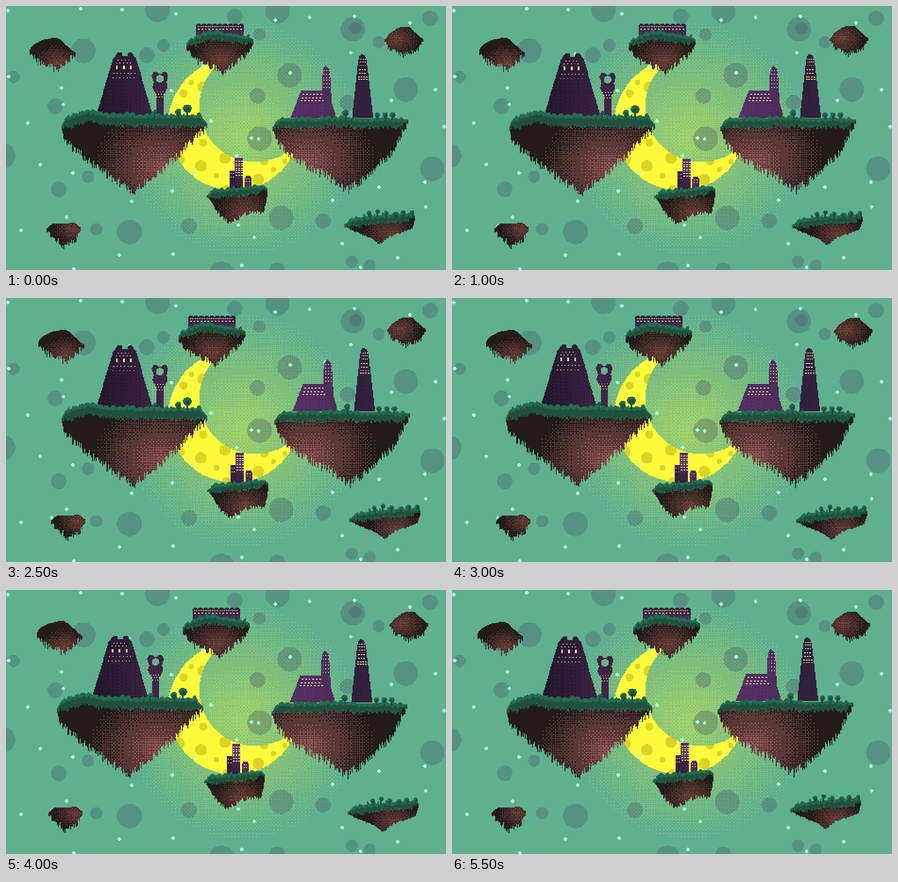
Recreate the animation shown at these times as an HTML page with a canvas. Size 966 by 580 pixels, loop 6 s.

```html
<!DOCTYPE html>
<html lang="en">
<head>
<meta charset="utf-8">
<title>Floating islands</title>
<style>
html, body { margin: 0; width: 100%; height: 100%; overflow: hidden; background: #5fb08f; }
canvas { display: block; width: 966px; height: 580px; image-rendering: pixelated; }
</style>
</head>
<body>
<canvas id="stage" width="500" height="300"></canvas>
<script>
// The art is 500 x 300 cells; shapes are given in stage pixels, motion in cells.
const W = 500, H = 300, K = 1.932, STEPS = 12, STEP_MS = 500;
const INK = '#231c1a', ROSE = '#8f5453', RUST = '#70413a';
const LEAF = '#236b50', MOSS = '#20503d', LAMP = '#ffdca0', STAR = '#a9ffe0';
const NIGHT = '#22182c', PLUM = '#432549', VIOLET = '#573168', DUSK = '#2c2038';

// Ordered 4 x 4 threshold, built from the bits of the cell position.
function dither(x, y, t) {
  const mix = (a, b) => 2 * (a ^ b) + b;
  const rank = 4 * mix(x & 1, y & 1) + mix(x >> 1 & 1, y >> 1 & 1);
  return t > (rank + 0.5) / 16;
}
const noise = (n, seed) => {
  const v = Math.sin(n * 127.1 + seed * 311.7) * 43758.5453;
  return v - Math.floor(v);
};
const points = s => s.split(' ').map(p => p.split(',').map(v => v / K));
const layer = () => {
  const c = document.createElement('canvas');
  c.width = W;
  c.height = H;
  return c.getContext('2d');
};
const dot = (g, x, y, color, w = 1, h = 1) => {
  g.fillStyle = color;
  g.fillRect(x, y, w, h);
};

function heightAt(line, x) {
  let i = 1;
  while (i < line.length - 1 && line[i][0] < x) i++;
  const [a, b] = [line[i - 1], line[i]];
  const u = Math.max(0, Math.min(1, (x - a[0]) / (b[0] - a[0])));
  return a[1] + (b[1] - a[1]) * u;
}

function disc(g, cx, cy, r, color) {
  cx /= K; cy /= K; r /= K;
  for (let y = Math.floor(cy - r); y <= cy + r; y++)
    for (let x = Math.floor(cx - r); x <= cx + r; x++)
      if (Math.hypot(x + 0.5 - cx, y + 0.5 - cy) < r) dot(g, x, y, color);
}

const discs = (g, list, r, color) =>
  points(list).forEach(([x, y]) => disc(g, x * K, y * K, r, color));

// One random place in every cell of a grid over the stage.
function scatter(cols, rows, seed, draw) {
  for (let i = 0; i < cols * rows; i++)
    draw((i % cols + noise(i, seed)) * 966 / cols,
      (Math.floor(i / cols) + noise(i, seed + 1)) * 580 / rows);
}

// Polygon filled with two dithered colours; the mix runs across or down.
function block(g, outline, a, b, from, to, vertical) {
  const p = points(outline);
  const xs = p.map(q => q[0]), ys = p.map(q => q[1]);
  const x0 = Math.min(...xs), x1 = Math.max(...xs);
  const y0 = Math.min(...ys), y1 = Math.max(...ys);
  for (let y = Math.floor(y0); y < y1; y++)
    for (let x = Math.floor(x0); x < x1; x++) {
      let inside = false;
      p.forEach(([ax, ay], i) => {
        const [bx, by] = p[(i + 1) % p.length];
        if (ay > y + 0.5 !== by > y + 0.5 &&
            x + 0.5 < ax + (bx - ax) * (y + 0.5 - ay) / (by - ay)) inside = !inside;
      });
      if (!inside) continue;
      const u = vertical ? (y - y0) / (y1 - y0) : (x - x0) / (x1 - x0);
      dot(g, x, y, dither(x, y, from + (to - from) * u) ? b : a);
    }
}

// Rows of lit windows around a centre line; spread widens each lower row.
function lamps(g, cx, y, half, rows, { gap = 7, step = 3, w = 1, h = 1, spread = 0 } = {}) {
  for (let r = 0; r < rows; r++) {
    const side = half + spread * r;
    for (let x = Math.round((cx - side) / K); x < (cx + side) / K; x += step)
      dot(g, x, Math.round((y + gap * r) / K), LAMP, w, h);
  }
}

function tree(g, x, y, r, base) {
  dot(g, Math.round(x / K) - 1, Math.round(y / K), MOSS, 2, Math.round((base - y) / K));
  disc(g, x, y, r, LEAF);
  disc(g, x + 1, y + r * 0.4, r * 0.7, MOSS);
}

function rock(g, o) {
  const top = points(o.top), bottom = points(o.bottom);
  const [gx, gy, gr] = o.glow.map(v => v / K);
  const x0 = Math.round(top[0][0]), x1 = Math.round(bottom[bottom.length - 1][0]);
  for (let x = x0; x < x1; x++) {
    const edge = Math.min(x - x0, x1 - 1 - x);
    const lump = o.grass && edge > 3
      ? Math.round(Math.abs(Math.sin(x * 0.42 + o.seed)) * 4 * noise(Math.floor(x / 7), o.seed)) : 0;
    const head = Math.round(heightAt(top, x)) - lump;
    const drip = (noise(x, o.seed) - 0.5) * Math.min(o.drip, edge * 2 + 2);
    const foot = Math.round(heightAt(bottom, x) + drip);
    for (let y = head; y < foot; y++) {
      const d = Math.hypot(x - gx, (y - gy) * 1.25) / gr;
      dot(g, x, y, dither(x, y, (1 - d) * 0.9) ? o.tint : INK);
    }
    if (!o.grass) continue;
    const thick = o.grass * Math.min(1, 0.35 + edge / 14);
    const turf = Math.round(thick + lump + (noise(x, o.seed + 4) - 0.5) * 4);
    const light = Math.round(thick * 0.2 + lump * 0.6 + Math.abs(Math.sin(x * 0.5 + o.seed)) * 2);
    dot(g, x, head, MOSS, 1, turf);
    dot(g, x, head, LEAF, 1, Math.min(turf, light));
    if (noise(x, o.seed + 8) > 0.7) dot(g, x, head + turf - 2, LEAF, 1, 2);
  }
}

function leftTowers(g) {
  block(g, '198,240 235,116 245,103 254,103 256,111 266,111 268,103 276,103 286,116 322,240',
    NIGHT, PLUM, 0, 0.75);
  lamps(g, 260, 117, 14, 2, { step: 4, spread: 4 });
  lamps(g, 259, 131, 18, 1, { step: 8, w: 2, h: 4 });
  lamps(g, 260, 147, 24, 2, { step: 4, gap: 10, spread: 2 });
  block(g, '319,153 324,145 331,145 334,148 341,148 344,145 351,145 356,153 352,168 354,178 346,198 346,240 331,240 331,198 321,178 324,168',
    PLUM, NIGHT, 0.05, 0.2);
  g.globalCompositeOperation = 'destination-out';
  disc(g, 338, 160, 8.5, '#000');
  g.globalCompositeOperation = 'source-over';
  lamps(g, 338, 187, 11, 3, { gap: 6, spread: -2 });
}

function rightTowers(g) {
  block(g, '624,246 648,186 693,186 695,140 703,131 711,140 715,212 725,246', VIOLET, PLUM, 0.1, 0.45);
  lamps(g, 672, 193, 20, 3, { step: 4, w: 2, spread: 2 });
  lamps(g, 704, 142, 6, 6);
  block(g, '760,246 773,120 776,109 782,106 788,109 792,120 806,246', DUSK, PLUM, 0.1, 0.3);
  lamps(g, 783, 115, 6, 3, { step: 2 });
  lamps(g, 783, 140, 8, 4, { w: 2, spread: 1 });
}

function fortress(g) {
  block(g, '417,68 417,41 521,41 521,68', DUSK, VIOLET, 0, 1, true);
  for (let x = 217; x < 268; x += 6) dot(g, x, 20, DUSK, 4, 2);
  lamps(g, 469, 45, 48, 1, { step: 2 });
  lamps(g, 469, 51, 47, 1, { step: 4, w: 2 });
}

function city(g) {
  block(g, '489,404 489,362 500,362 500,404', DUSK, PLUM, 0.2, 0.5);
  block(g, '500,404 500,335 518,335 518,404', VIOLET, DUSK, 0, 0.9, true);
  lamps(g, 509, 340, 6, 7, { gap: 5, w: 2 });
  lamps(g, 495, 368, 4, 2);
  block(g, '522,400 522,377 526,372 533,372 537,377 537,400', VIOLET, DUSK, 0.1, 0.5);
  lamps(g, 530, 378, 5, 2);
}

// Each swing is [least, most, step of least, step of most].
const STILL = [0, 0, 0, 6];
const islands = [
  { seed: 1, x: [0, 12, 0, 6], y: [0, 1.6, 8, 3.5], drip: 8, tint: RUST, glow: [112, 124, 54],
    top: '52,92 60,82 80,73 105,67 114,69 152,102',
    bottom: '52,106 70,121 100,133 111,140 120,130 153,105' },
  { seed: 2, x: [0, 8, 1, 8], y: [-3, 1, 4.5, 9], drip: 6, tint: RUST, glow: [852, 73, 52],
    top: '827,76 836,63 860,48 880,48 911,75',
    bottom: '827,82 838,96 868,110 900,99 911,78' },
  { seed: 3, x: [-1, 5, 11, 5], y: STILL, drip: 8, tint: RUST, glow: [148, 489, 46],
    top: '89,488 103,477 150,476 164,487',
    bottom: '89,495 110,514 127,530 150,515 164,492' },
  { seed: 4, x: [-0.5, 7, 11.5, 6], y: [0, 4.4, 0.5, 7], drip: 2, tint: RUST, glow: [842, 500, 58], grass: 9,
    top: '742,479 760,468 810,461 890,455 898,461',
    bottom: '742,485 805,512 818,523 845,505 890,489 898,465',
    front: g => { for (let x = 797; x < 895; x += 19) tree(g, x, 458 - noise(x, 2) * 8, 5, 464); } },
  { seed: 5, x: [-9.4, 1.4, 5, 11], y: STILL, drip: 8, tint: RUST, glow: [472, 118, 70],
    grass: 9, back: fortress,
    top: '397,82 400,75 440,59 470,58 534,68 543,75',
    bottom: '397,95 420,121 455,134 473,148 522,111 543,80' },
  { seed: 6, x: [-2, 4, 8, 3], y: [0, 3, 0, 6], drip: 5, tint: RUST, glow: [520, 452, 64],
    grass: 9, back: city,
    top: '439,415 450,406 510,399 565,394 572,403',
    bottom: '439,420 460,452 488,476 525,455 564,452 572,408' },
  { seed: 7, x: [-5.5, 4, 7.5, 3.3], y: [-1.3, 2, 8, 4], drip: 11, tint: ROSE, glow: [338, 350, 152],
    grass: 13, back: leftTowers,
    top: '122,261 127,250 150,237 180,229 225,237 320,240 425,240 442,259',
    bottom: '122,267 127,297 155,319 205,357 278,410 350,353 390,313 442,264',
    front: g => { tree(g, 398, 225, 9, 244); tree(g, 378, 233, 7, 244); tree(g, 327, 233, 5, 244); } },
  { seed: 8, x: [-2.5, 3.5, 9.5, 3.5], y: [-1.2, 2.4, 10.5, 6], drip: 11, tint: ROSE, glow: [662, 338, 152],
    grass: 10, back: rightTowers,
    top: '586,264 592,254 605,247 745,246 882,249',
    bottom: '586,270 600,307 650,349 700,371 748,405 795,371 850,318 882,255',
    front: g => { tree(g, 745, 235, 7, 250); for (let x = 815; x < 855; x += 17) tree(g, x, 239, 6, 250); } }
];

function paintMoon() {
  const g = layer(), shade = '#dcd424';
  disc(g, 501, 260, 145, '#fffb3c');
  g.globalCompositeOperation = 'source-atop';
  discs(g, '433,178 380,337 428,351 481,334 554,381', 12.5, shade);
  discs(g, '390,192 433,300 567,341 484,403', 9, shade);
  discs(g, '407,168 462,373 587,359 612,342', 6, shade);
  g.globalCompositeOperation = 'destination-out';
  disc(g, 547, 220, 122.5, '#000');
  return g.canvas;
}

function paintSky() {
  const g = layer(), haze = 'rgba(70,85,100,.33)';
  dot(g, 0, 0, '#5fb08f', W, H);
  for (let y = 0; y < H; y++)
    for (let x = 0; x < W; x++)
      if (dither(x, y, 1 - Math.hypot(x - 268.5, y - 150) / 136)) dot(g, x, y, '#9fd06b');
  discs(g, '333,8 596,11 762,51 170,98 623,152 878,183 557,291 -6,329 936,357 604,465 271,496 473,588', 27, haze);
  discs(g, '502,23 931,27 309,108 108,220 552,197 750,212 116,402 402,483 696,472 595,580', 17, haze);
  scatter(5, 2, 21, (x, y) => disc(g, x, y, 13.5, haze));
  g.drawImage(paintMoon(), 0, 0);
  scatter(9, 6, 33, (x, y) => {
    const sx = Math.round(x / K) - 2, sy = Math.round(y / K) - 2;
    dot(g, sx + 1, sy, STAR, 2, 4);
    dot(g, sx, sy + 1, STAR, 4, 2);
  });
  return g.canvas;
}

function paintIsland(o) {
  const g = layer();
  if (o.back) o.back(g);
  rock(g, o);
  if (o.front) o.front(g);
  return g.canvas;
}

// Drifts evenly from least to most and back, in whole cells.
function swing([least, most, low, high], step) {
  const wrap = v => (v + STEPS) % STEPS;
  const rise = wrap(high - low), since = wrap(step - low);
  const u = since < rise ? since / rise : (STEPS - since) / (STEPS - rise);
  return Math.round(least + (most - least) * u);
}

const sky = paintSky();
islands.forEach(o => { o.image = paintIsland(o); });
const stage = document.getElementById('stage').getContext('2d');
const start = performance.now();

function draw() {
  const step = Math.floor((performance.now() - start) / STEP_MS) % STEPS;
  stage.drawImage(sky, 0, 0);
  islands.forEach(o => stage.drawImage(o.image, swing(o.x, step), swing(o.y, step)));
  requestAnimationFrame(draw);
}
draw();
</script>
</body>
</html>
```
